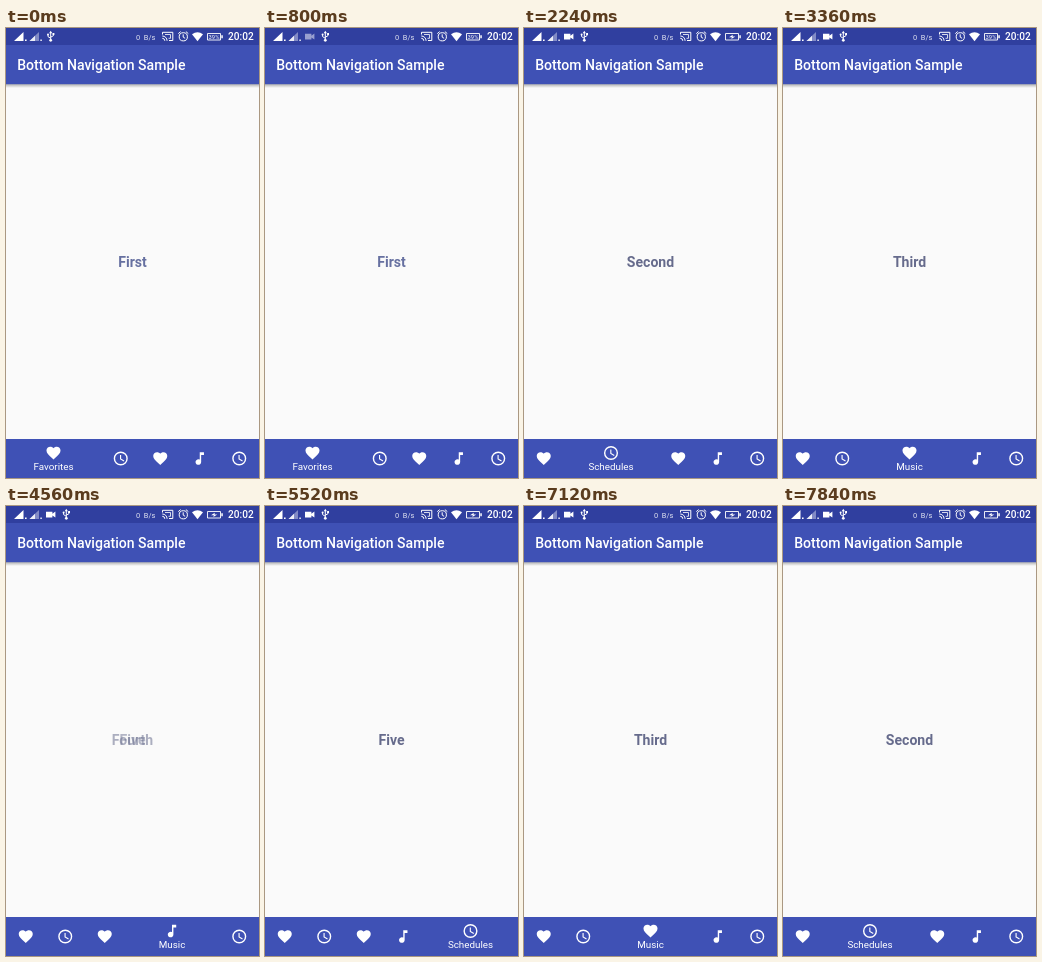
Animation, 253 px wide and 450 px high, one loop 8000 ms. Source, as an HTML page:

```html
<!DOCTYPE html>
<html lang="en">
<head>
<meta charset="utf-8">
<title>Bottom navigation</title>
<style>
  html, body { margin: 0; width: 100%; height: 100%; overflow: hidden; background: #fafafa; }
  svg { display: block; width: 100%; height: 100%; }
  text { font-family: Roboto, sans-serif; fill: #fff; }
  .line { fill: none; stroke: #fff; }
  .page { font-size: 14.06px; font-weight: 700; text-anchor: middle; }
  .label { font-size: 9.84px; text-anchor: middle; }
</style>
</head>
<body>
<svg viewBox="0 0 253 450" preserveAspectRatio="none">
  <defs>
    <linearGradient id="shade" x2="0" y2="1">
      <stop offset="0" stop-color="#000" stop-opacity=".3"/>
      <stop offset="1" stop-color="#000" stop-opacity="0"/>
    </linearGradient>
    <path id="heart" fill="#fff" d="M12 21.35 10.55 20C5.4 15.36 2 12.28 2 8.5 2 5.4 4.4 3 7.5 3c1.74 0 3.4.8 4.5 2.1C13.1 3.8 14.76 3 16.5 3 19.6 3 22 5.4 22 8.5c0 3.78-3.4 6.86-8.55 11.5z"/>
    <g id="clock" class="line">
      <circle cx="12" cy="12" r="9" stroke-width="2"/>
      <path d="M11.75 7v5.6l4.9 2.9" stroke-width="1.6"/>
    </g>
    <path id="note" fill="#fff" d="M12 3v10.55A4 4 0 1 0 14 17V7h4V3z"/>
  </defs>

  <rect width="253" height="450" fill="#fafafa"/>
  <rect y="56" width="253" height="4" fill="url(#shade)"/>
  <rect width="253" height="56.2" fill="#3f51b5"/>
  <rect width="253" height="17" fill="#303f9f"/>
  <text x="11.2" y="42" font-size="14.06" font-weight="500">Bottom Navigation Sample</text>

  <!-- status bar, left -->
  <path d="M8 13 17.5 4v9zM19 11.5h1.6V13H19z" fill="#fff"/>
  <path d="M23.5 13 33 4v9z" fill="#fff" opacity=".4"/>
  <path d="M23.5 13 29 7.8V13zM34.3 11.5h1.6V13h-1.6z" fill="#fff" opacity=".85"/>
  <path id="camera" d="M40 5.7h6.4v2.1l3-2.2v6l-3-2.2v2.2H40z" fill="#fff"/>
  <g id="usb">
    <path class="line" d="M0 4v8M0 10.3-2.7 8.6V6.6M0 9.2l2.7-1.5V6"/>
    <path d="M-1.6 5.2 0 2.8l1.6 2.4zM1.8 5h1.9v1.9H1.8z" fill="#fff"/>
    <circle cy="12.3" r="1.4" fill="#fff"/>
    <circle cx="-2.7" cy="6.4" r="1" fill="#fff"/>
  </g>

  <!-- status bar, right -->
  <text x="130" y="11.8" font-size="7.4" opacity=".85" xml:space="preserve" style="white-space:pre">0  B/s</text>
  <g class="line">
    <path d="M156.5 6.5V4.3h10.3v8.2H163M156.3 8a4.8 4.8 0 0 1 4.8 4.8M156.3 10.3a2.5 2.5 0 0 1 2.5 2.5"/>
    <path d="M159 6.5h5.5v3.8h-2" stroke-width=".8"/>
    <circle cx="177.3" cy="8.8" r="4.1"/>
    <path d="M177.2 6.3v2.8l1.9 1.2M172.3 5.6l2.4-2M182.3 5.6l-2.4-2"/>
    <path d="M201.5 5.5h13v6.5h-13z" stroke-width=".9"/>
  </g>
  <path d="M186 6.2q5.5-4 11 0l-5.5 7z" fill="#fff"/>
  <path d="M215.3 7.2h1.5v3h-1.5z" fill="#fff"/>
  <text id="percent" x="208" y="11" font-size="5.8" text-anchor="middle">39%</text>
  <path id="bolt" d="M205 9.2l3.8-2.5-.3 1.7h2.8l-3.9 2.6.4-1.8z" fill="#fff"/>
  <text x="222" y="12.3" font-size="10.1" font-weight="500">20:02</text>

  <g id="pages"></g>
  <rect y="411" width="253" height="39" fill="#3f51b5"/>
  <g id="tabs"></g>
</svg>
<script>
const LOOP = 8000, FADE = 170, MOVE_DELAY = 90, MOVE = 200;
const SLIM = 39.5, GROWTH = 55.5;
const TABS = [
  ['First', 'heart', 'Favorites'],
  ['Second', 'clock', 'Schedules'],
  ['Third', 'heart', 'Music'],
  ['Fourth', 'note', 'Music'],
  ['Five', 'clock', 'Schedules']
];
// [time, selected tab]
const STEPS = [[-1000, 0], [1050, 1], [2520, 2], [3620, 3], [4480, 4], [5720, 3], [6720, 2], [7400, 1]];

const $ = id => document.getElementById(id);
function add(parent, name, attrs, text = '') {
  const node = document.createElementNS('http://www.w3.org/2000/svg', name);
  for (const key in attrs) node.setAttribute(key, attrs[key]);
  node.textContent = text;
  return parent.appendChild(node);
}

const tabs = TABS.map(([title, icon, label], i) => {
  const page = add($('pages'), 'text', { class: 'page', x: 126.5, y: 239 }, title);
  page.style.fill = i ? '#666b8c' : '#6670a0';
  const group = add($('tabs'), 'g', {});
  const glyph = add(group, 'use', { href: '#' + icon });
  const caption = add(group, 'text', { class: 'label', y: 442 }, label);
  return { page, group, glyph, caption };
});

const progress = (t, start, length) => Math.min(1, Math.max(0, (t - start) / length));
const smooth = p => p * p * (3 - 2 * p);
const show = (id, opacity) => $(id).setAttribute('opacity', opacity);

function draw(t) {
  const k = STEPS.findLastIndex(([start]) => t >= start);
  const [start, current] = STEPS[k];
  const previous = k ? STEPS[k - 1][1] : current;
  const weight = (i, p) => current === previous ? +(i === current)
    : i === current ? p : i === previous ? 1 - p : 0;
  const fade = progress(t, start, FADE);
  const move = smooth(progress(t, start + MOVE_DELAY, MOVE));

  let left = 0;
  tabs.forEach(({ page, group, glyph, caption }, i) => {
    const w = weight(i, move), width = SLIM + GROWTH * w;
    page.setAttribute('opacity', weight(i, fade));
    group.setAttribute('transform', `translate(${left + width / 2} 0)`);
    glyph.setAttribute('transform', `translate(0 ${430.5 - 5.5 * w}) scale(.703) translate(-12 -12)`);
    caption.setAttribute('opacity', w);
    left += width;
  });

  const recording = t >= 400;
  const dim = (t - 560 + 1120) % 1120 < 480;
  show('camera', recording ? (dim ? .5 : 1) : 0);
  $('usb').setAttribute('transform', `translate(${recording ? 60.3 : 44.7} 0)`);
  const charging = t % 2800 >= 1400;
  show('bolt', +charging);
  show('percent', +!charging);
}

function tick() {
  draw(performance.now() % LOOP);
  requestAnimationFrame(tick);
}
tick();
</script>
</body>
</html>
```
